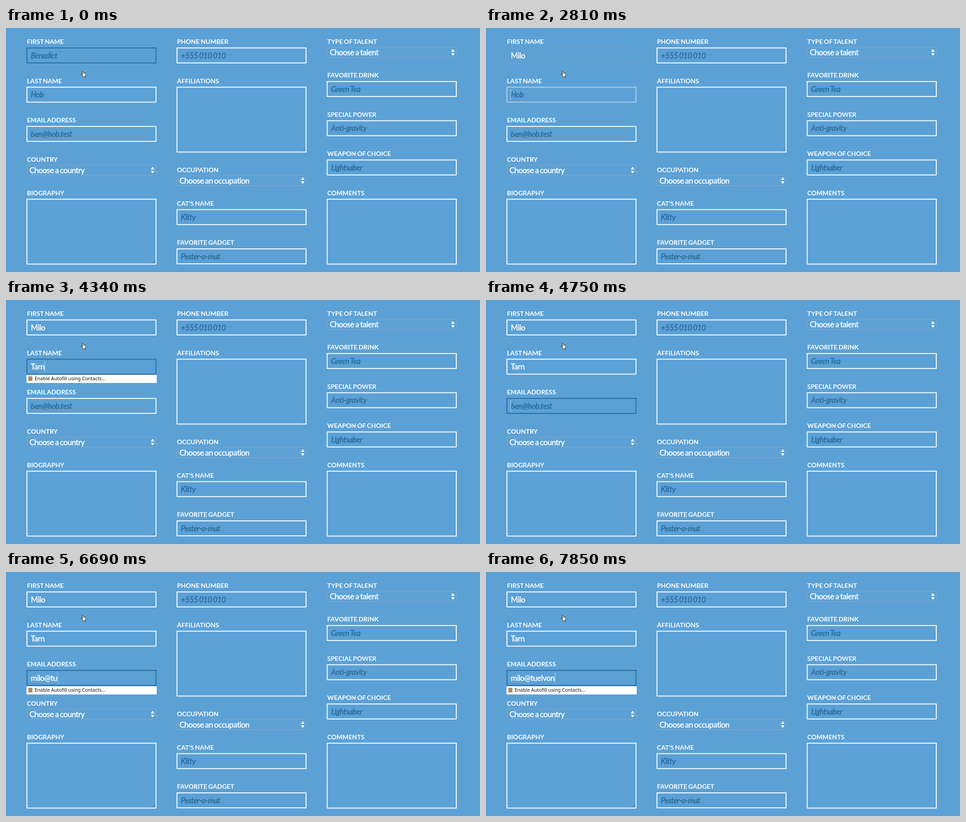
Recreate the animation shown at these times as an HTML page. Size 1041 px wide and 538 px high, loop 8 s.

```html
<!DOCTYPE html>
<html lang="en">
<head>
<meta charset="utf-8">
<title>Talent form</title>
<style>
  html, body { margin: 0; width: 100%; height: 100%; overflow: hidden; background: #5ba1d6; }
  svg { display: block; width: 1041px; height: 538px; font-family: Lato, sans-serif; }
  text { fill: #fff; white-space: pre; word-spacing: -1px; }
  .label { font-size: 14px; font-weight: 700; }
  .value, .hint { font-size: 17px; letter-spacing: -.5px; stroke: #fff; stroke-width: .45; }
  .hint { fill: #2b6a9c; stroke: #2b6a9c; font-style: italic; }
  .box { fill: none; stroke: #fff; stroke-width: 2; }
  .select { fill: none; stroke: #86a9c4; stroke-width: 1; }
  .grip { stroke: #4479a3; stroke-width: 1; }
  .tip { font: 500 10.5px "Noto Sans", sans-serif; fill: #111; word-spacing: 0; }
</style>
</head>
<body>
<svg id="stage" viewBox="0 0 1041 538">
  <g id="form"></g>
  <g id="popup">
    <rect x="45" y="79" width="286" height="18" fill="#fff"/>
    <rect x="49" y="82.5" width="9" height="10" fill="#b08a62"/>
    <text class="tip" x="63" y="91">Enable Autofill using Contacts…</text>
  </g>
  <rect id="caret" y="49" width="1" height="24" fill="#b9d8ef"/>
  <path id="hand" fill="#fff" stroke="#000" stroke-width="1" stroke-linejoin="round"
    d="M167.6 96.2q1.2-.8 1.9.5l1.2 2.5 1-.3 1.2.4 1.2.3 1 1.2.2 3-1 2.2v1.8h-5l-1.2-2.3-2.4-3q0-1.2 1.4-.9l1.6 1.1-1.7-4.9q-.1-1 .6-1.6z"/>
  <path id="arrow" fill="#000" stroke="#fff" stroke-width=".8"
    d="M168 94.5v10.3l2.3-2.1 1.6 3.7 1.7-.7-1.6-3.6h3.2z"/>
</svg>
<script>
const LOOP = 8000, WIDTH = 285.4, WHITE = [255, 255, 255], DARK = [42, 107, 160];
const $ = id => document.getElementById(id);
const form = $('form');

function add(tag, attrs, text = '') {
  const el = document.createElementNS('http://www.w3.org/2000/svg', tag);
  for (const key in attrs) el.setAttribute(key, attrs[key]);
  el.textContent = text;
  return form.appendChild(el);
}
const write = (cls, x, y, text) => add('text', { class: cls, x, y }, text);
const frame = (x, y, h) => add('rect', { class: 'box', x: x + 1, y: y + 1, width: WIDTH - 2, height: h - 2 });

// Each part is drawn below its label, whose baseline is y.
const parts = {
  input(x, y, hint) {
    const box = frame(x, y + 8, 35);
    return { box, hint: write('hint', x + 9.5, y + 31.5, hint), value: write('value', x + 9.5, y + 31.5, '') };
  },
  area(x, y) {
    frame(x, y + 8, 145);
    const r = x + 283, b = y + 150;
    add('path', { class: 'grip', d: `M${r - 7} ${b}l7-7M${r - 3} ${b}l3-3` });
  },
  select(x, y, text) {
    add('rect', { class: 'select', x: x + .5, y: y + 7.5, width: WIDTH - 1, height: 22.5, rx: 3 });
    write('value', x + 6.5, y + 25, text);
    const c = x + 277, m = y + 19;
    add('path', { fill: '#fff', d: `M${c - 4} ${m - 1.5}h8l-4-6zM${c - 4} ${m + 1.5}h8l-4 6z` });
  }
};

const columns = [
  [45, [
    [35, 'FIRST NAME', 'input', 'Benedict'],
    [121.5, 'LAST NAME', 'input', 'Hob'],
    [208, 'EMAIL ADDRESS', 'input', 'ben@hob.test'],
    [294.5, 'COUNTRY', 'select', 'Choose a country'],
    [368.5, 'BIOGRAPHY', 'area']]],
  [374.5, [
    [35, 'PHONE NUMBER', 'input', '+555 010 010'],
    [121.5, 'AFFILIATIONS', 'area'],
    [317.5, 'OCCUPATION', 'select', 'Choose an occupation'],
    [391.5, 'CAT\'S NAME', 'input', 'Kitty'],
    [478, 'FAVORITE GADGET', 'input', 'Pester-o-mat']]],
  [704.5, [
    [35, 'TYPE OF TALENT', 'select', 'Choose a talent'],
    [109, 'FAVORITE DRINK', 'input', 'Green Tea'],
    [195.5, 'SPECIAL POWER', 'input', 'Anti-gravity'],
    [282, 'WEAPON OF CHOICE', 'input', 'Lightsaber'],
    [368.5, 'COMMENTS', 'area']]]
];
const fields = columns.flatMap(([x, rows]) => rows.map(([y, label, kind, text]) => {
  write('label', x + 1, y, label);
  return parts[kind](x, y, text);
})).slice(0, 3);

const typing = [
  ['Milo', [1500, 1760, 2060, 2180]],
  ['Tarn', [3920, 4040, 4220, 4340]],
  ['milo@tuelvon', [5370, 5550, 5790, 5910, 6270, 6570, 6690, 7160, 7490, 7670, 7760, 7850]]
];
const focusAt = [0, 2810, 4750];
const popupSpans = [[1500, 2810], [3920, 4750], [5370, 7160], [7220, LOOP]];
const caretGaps = [[0, 120], [630, 1110], [3410, 3920], [5230, 5370]];
const within = (spans, t) => spans.some(([a, b]) => t >= a && t < b);
const show = (el, on) => el.setAttribute('visibility', on ? 'visible' : 'hidden');
const mix = k => `rgb(${WHITE.map((w, i) => Math.round(w + (DARK[i] - w) * k))})`;

// The first focus change fades in three steps, the second is immediate.
const fade = t => t < 2810 ? 0 : t < 2870 ? .33 : t < 2930 ? .67 : 1;

function draw(t) {
  const active = focusAt.filter(at => t >= at).length - 1;
  const k = fade(t);
  const tint = [1 - k, active === 1 ? k : 0, active === 2 ? 1 : 0];
  fields.forEach((field, i) => {
    const [text, times] = typing[i];
    const typed = text.slice(0, times.filter(at => t >= at).length);
    if (field.value.textContent !== typed) field.value.textContent = typed;
    show(field.hint, !typed);
    field.box.style.stroke = mix(tint[i]);
  });
  const { value } = fields[active], dy = active * 86.5;
  const width = value.textContent ? value.getComputedTextLength() : -.5;
  $('caret').setAttribute('x', Math.round(54.5 + width));
  $('caret').setAttribute('y', 49 + Math.floor(dy));
  show($('caret'), !within(caretGaps, t));
  $('popup').setAttribute('transform', `translate(0 ${Math.floor(dy)})`);
  show($('popup'), within(popupSpans, t));
  const arrow = t >= 1500 && t < 2810;
  show($('arrow'), arrow);
  show($('hand'), !arrow);
}

const start = performance.now();
function tick() {
  draw((performance.now() - start) % LOOP);
  requestAnimationFrame(tick);
}
draw(0);
requestAnimationFrame(tick);
</script>
</body>
</html>
```
